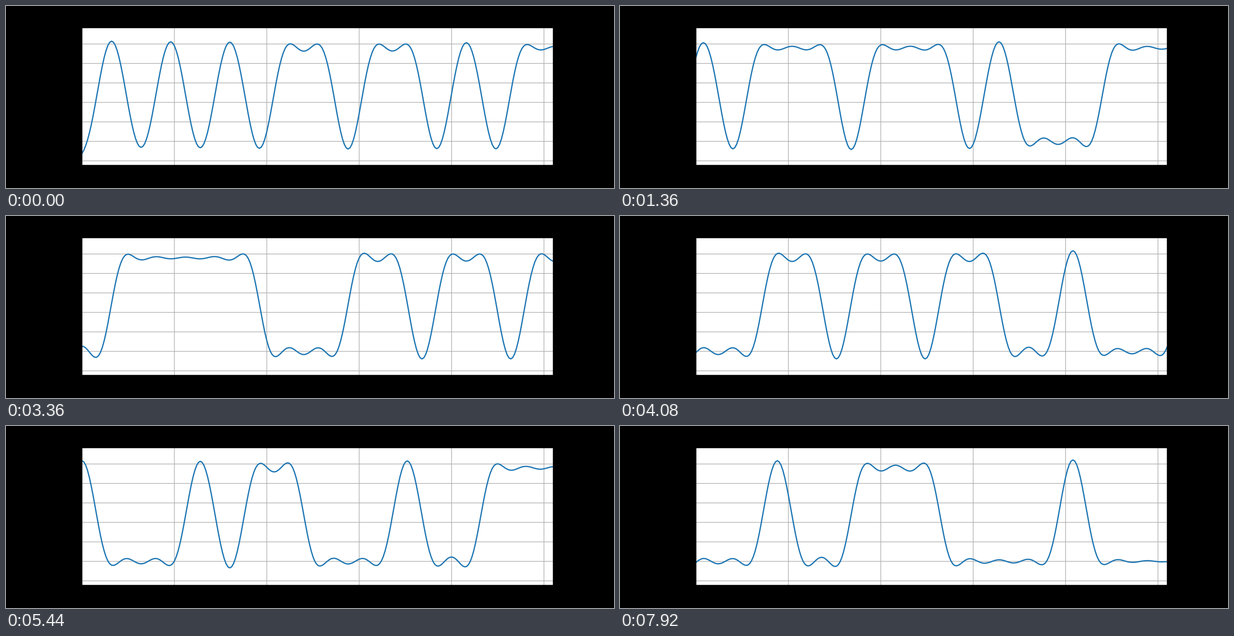
Animation, 1280 px wide and 384 px high, one loop 8 s. Source, as a matplotlib script:

```python
import matplotlib.pyplot as plt
import numpy as np
from matplotlib.animation import FuncAnimation

FRAMES, INTERVAL = 100, 80
SPB = 16      # samples per bit
STEP = 12     # samples scrolled per frame
WINDOW = 256  # samples on screen
SPAN = 20     # pulse reach, in bits

# The binary message carried by the wave
MESSAGE = ("10" * 3 + "110" * 2 + "10" + "1110" * 2 + "1000 111100 11111000"
           + "110" * 2 + "1100 1000 10 11000 100 11110 110 1000 100"
           + "1110000 10000").replace(" ", "")


def pulse(t):
    """Band-limited bit pulse, t in bits, built from its spectrum on 0..1."""
    n = 400
    f = (np.arange(n) + 0.5) / n
    spec = (0.38 * np.cos(np.pi * f / 2)
            + 0.29 * (1 + np.cos(np.pi * f))
            - 0.0155 * np.sin(np.pi * f) ** 2)
    body = 2 * np.cos(2 * np.pi * np.outer(t, f)) @ spec / n
    return body - 0.003 * np.cos(2 * np.pi * t) * np.exp(-t ** 2 / 3)


def make_signal():
    bits = [int(b) for b in "00" + MESSAGE]
    train = np.zeros(len(bits) * SPB)
    train[::SPB] = bits
    train[SPB // 2] = -0.2  # start-up dip just before the window
    reach = SPAN * SPB
    kernel = pulse(np.arange(-reach, reach + 1) / SPB)
    return np.convolve(train, kernel)[reach + SPB:reach + len(train)]


signal = make_signal()

fig = plt.figure(figsize=(10, 3), dpi=128, facecolor="black")
ax = fig.add_axes([0.125, 0.125, 0.775, 0.755])
ax.set_xlim(0, WINDOW - 1)
ax.set_xticks(range(0, WINDOW, 50))
ax.set_yticks(np.linspace(-0.2, 1, 7))
ax.set_ylim(-0.2455, 1.1661)
ax.grid(True, color="#b0b0b0", linewidth=0.8)
ax.tick_params(length=0, labelleft=False, labelbottom=False)
for part in [*ax.get_xgridlines(), *ax.get_ygridlines(), *ax.spines.values()]:
    part.set_snap(False)
line, = ax.plot(signal[:WINDOW], color="#1f77b4", lw=1.5)


def update(i):
    start = i * STEP
    line.set_ydata(signal[start:start + WINDOW])
    return line,


anim = FuncAnimation(fig, update, frames=FRAMES, interval=INTERVAL,
                     repeat=True, repeat_delay=0, blit=False)
plt.show()
```
